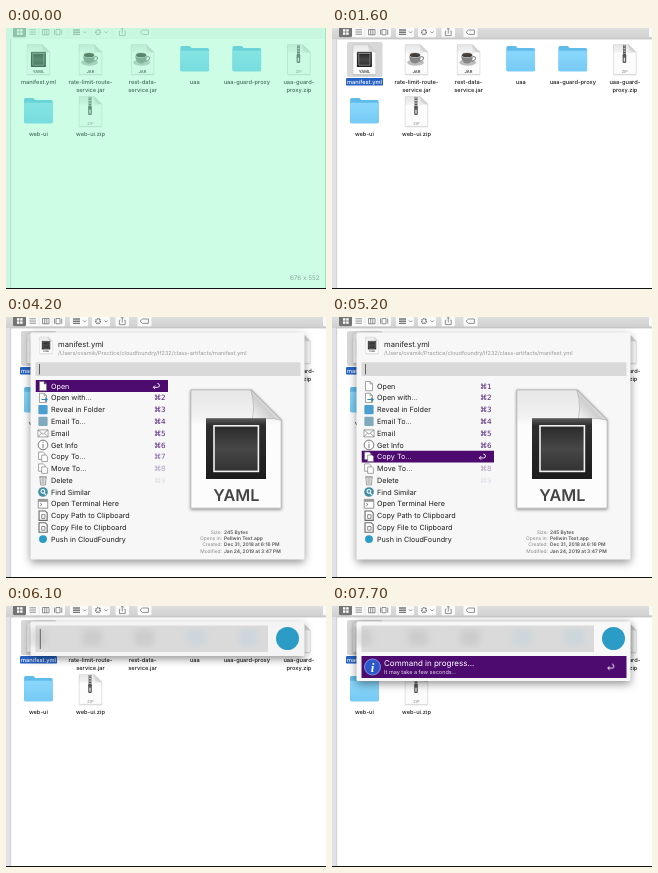
Recreate the animation shown at these times as an HTML page. Size 320 by 261 pixels, loop 7.9 s.

```html
<!DOCTYPE html>
<html lang="en">
<head>
<meta charset="utf-8">
<title>Push from the file browser</title>
<style>
  html, body { margin: 0; width: 100%; height: 100%; overflow: hidden; background: #fff; }
  svg { display: block; width: 100vw; height: 100vh; }
  text { font-family: Inter, "Open Sans", sans-serif; text-rendering: geometricPrecision; }
  .mid { text-anchor: middle; }
  .end { text-anchor: end; }
  .label { font-size: 5.7px; font-weight: 500; fill: #1c1c1c; }
  .kind { font-size: 4.05px; font-weight: 600; fill: #444; }
  .row { font-size: 7.2px; fill: #1c1c1c; }
  .key { font: 7.2px "DejaVu Sans", sans-serif; fill: #4d1a78; }
  .meta { font-size: 4.9px; fill: #8a8a8a; }
  .meta .val { font-weight: 600; fill: #555; }
  .sel .row { fill: #fff; }
  .ret { fill: none; stroke: #fff; stroke-width: .9; }
  .panel { filter: drop-shadow(0 3px 4px rgba(0, 0, 0, .42)); }

  .anim { animation: 7.9s step-end infinite; }
  .flash { animation-name: flash; }
  .active { animation-name: active; }
  .dim { animation-name: dim; }
  .menu { animation-name: menu; }
  .bar { animation-name: bar; }
  .busy { animation-name: busy; }
  .enter { animation-name: enter; }
  .caret { animation-name: caret; }
  .pick { animation-name: pick; }

  @keyframes flash { 0% { opacity: 1 } 1.26%, 100% { opacity: 0 } }
  @keyframes active { 0% { opacity: 0 } 20.25%, 100% { opacity: 1 } }
  @keyframes dim { 0% { opacity: .65 } 20.25%, 100% { opacity: 1 } }
  @keyframes menu { 0% { opacity: 0 } 53.16% { opacity: 1 } 77.21%, 100% { opacity: 0 } }
  @keyframes bar { 0% { opacity: 0 } 77.21%, 100% { opacity: 1 } }
  @keyframes busy { 0% { opacity: 0 } 88.6%, 100% { opacity: 1 } }
  @keyframes enter { 0% { opacity: 0 } 91.13%, 100% { opacity: 1 } }
  @keyframes caret {
    0% { opacity: 1 } 58.22% { opacity: 0 } 64.55% { opacity: 1 } 70.88% { opacity: 0 }
    77.21% { opacity: 1 } 83.54% { opacity: 0 } 91.13% { opacity: 1 } 97.46%, 100% { opacity: 0 }
  }
  /* one menu row is 11.77px high */
  @keyframes pick {
    0% { transform: translateY(0) }
    58.22% { transform: translateY(11.77px) }
    59.49% { transform: translateY(23.54px) }
    63.29% { transform: translateY(35.31px) }
    64.55% { transform: translateY(47.08px) }
    65.82% { transform: translateY(70.62px) }
    67.08% { transform: translateY(82.39px) }
    68.35% { transform: translateY(94.16px) }
    70.88% { transform: translateY(105.93px) }
    72.15% { transform: translateY(117.7px) }
    73.41% { transform: translateY(129.47px) }
    74.68% { transform: translateY(141.24px) }
    75.94%, 100% { transform: translateY(153.01px) }
  }
</style>
</head>
<body>
<svg viewBox="0 0 320 261" preserveAspectRatio="none">
  <defs>
    <linearGradient id="tool" x2="0" y2="1">
      <stop stop-color="#dedede"/><stop offset="1" stop-color="#cfcfcf"/>
    </linearGradient>
    <linearGradient id="sky" x2="0" y2="1">
      <stop stop-color="#8ad7fb"/><stop offset="1" stop-color="#76caf5"/>
    </linearGradient>
    <linearGradient id="paper" x2="0" y2="1">
      <stop stop-color="#e6e6e6"/><stop offset=".22" stop-color="#f1f1f1"/><stop offset=".3" stop-color="#fcfcfc"/>
    </linearGradient>
    <linearGradient id="bevel" x2="0" y2="1">
      <stop stop-color="#5c5c5c"/><stop offset=".12" stop-color="#2e2e2e"/><stop offset="1" stop-color="#1c1c1c"/>
    </linearGradient>
    <linearGradient id="slate" x2="0" y2="1">
      <stop stop-color="#2a2a2a"/><stop offset=".5" stop-color="#474747"/><stop offset="1" stop-color="#333"/>
    </linearGradient>
    <linearGradient id="curl" x1="0" y1="1" x2="1" y2="0">
      <stop stop-color="#fff"/><stop offset=".45" stop-color="#cfcfcf"/><stop offset=".8" stop-color="#f6f6f6"/>
    </linearGradient>
    <filter id="soft"><feGaussianBlur stdDeviation="3"/></filter>
    <filter id="lift" x="-20%" y="-20%" width="140%" height="140%">
      <feDropShadow dx="0" dy=".3" stdDeviation=".45" flood-opacity=".4"/>
    </filter>
    <clipPath id="slot"><rect class="anim pick" x="29.5" y="63.1" width="132.5" height="11.9"/></clipPath>

    <g id="doc">
      <path d="M.2.2H15.4L22.8 7.6V29.8H.2Z" fill="url(#paper)" stroke="#aaa" stroke-width=".2" filter="url(#lift)"/>
      <path d="M15.2.2Q16.6 5 15.2 8.6Q18.6 6.6 22.8 7.8Z" fill="url(#curl)" stroke="#aaa" stroke-width=".15"/>
    </g>
    <g id="yaml">
      <use href="#doc"/>
      <rect x="4" y="7.3" width="15" height="15.2" fill="url(#bevel)"/>
      <rect x="6" y="9.2" width="11.1" height="11.4" fill="url(#slate)" stroke="#f2f2f2" stroke-width=".4"/>
      <text class="kind mid" x="11.6" y="28">YAML</text>
    </g>
    <g id="jar">
      <use href="#doc"/>
      <ellipse cx="10.6" cy="18" rx="8.4" ry="3.2" fill="#bdbdbd"/>
      <path d="M4 10.5Q4.5 19 10 19T16 10.5Z" fill="#858585"/>
      <path d="M15.5 12q4.4 .2 2.6 2.8t-4.4 1.5" fill="none" stroke="#858585" stroke-width="1.1"/>
      <ellipse cx="10" cy="10.5" rx="6.2" ry="3" fill="#dcdcdc"/>
      <ellipse cx="10" cy="10.7" rx="5" ry="2.1" fill="#453d39"/>
      <text class="kind mid" x="11.4" y="28">JAR</text>
    </g>
    <g id="zip">
      <use href="#doc"/>
      <path d="M11 .4V12" stroke="#555" stroke-width="2.8"/>
      <path d="M11 .4V12" stroke="#ccc" stroke-width="1.8" stroke-dasharray=".8 .8"/>
      <rect x="9.2" y="9.5" width="3.6" height="9" rx="1.3" fill="#555"/>
      <rect x="10.3" y="13" width="1.4" height="4.2" rx=".6" fill="#ddd"/>
      <text class="kind mid" x="11.4" y="28" style="font-weight:400;fill:#888">ZIP</text>
    </g>
    <g id="folder">
      <path d="M0 2Q0 .4 1.4 .4H9.2L11.2 2.4H27Q28.6 2.4 28.6 4V24Q28.6 25.6 27 25.6H1.6Q0 25.6 0 24Z" fill="#5fbbe9"/>
      <path d="M0 5H28.6V24Q28.6 25.6 27 25.6H1.6Q0 25.6 0 24Z" fill="url(#sky)"/>
    </g>
    <path id="ret" class="ret" d="M4.8-2.2Q7-2.2 7-.2T4.8 1.6H.8M2.6-.2L.8 1.6L2.6 3.4"/>
  </defs>

  <rect width="320" height="261" fill="#fff"/>
  <rect width="5" height="261" fill="#f8f8f9"/>
  <rect width="320" height="11" fill="#f5f5f5"/>
  <g class="anim active">
    <rect width="5" height="261" fill="#e1e1e6"/>
    <rect width="320" height="11" fill="url(#tool)"/>
    <path d="M4.5 11H320" stroke="#bcbcbc" stroke-width=".7"/>
    <rect x="15" y="14" width="35.5" height="35" rx="2" fill="#d8d8d8"/>
  </g>
  <path d="M4.7 11V260" stroke="#c8c8cc" stroke-width=".7"/>

  <g id="tools" class="anim dim"></g>
  <g id="files"></g>
  <g class="anim active">
    <rect x="14" y="50" width="37" height="7.6" rx="1.2" fill="#2561c4"/>
    <text class="label mid" x="32.5" y="56" style="fill:#fff">manifest.yml</text>
  </g>

  <g class="anim menu">
    <rect class="panel" x="24.5" y="15.5" width="274" height="227" rx="1.5" fill="#f7f7f7"/>
    <use href="#yaml" transform="translate(33.6 19.8) scale(.56)"/>
    <text x="52" y="30" font-size="7.6" fill="#222">manifest.yml</text>
    <text x="52" y="38.4" font-size="5.55" fill="#999">/Users/ovamik/Practice/cloudfoundry/lf232/class-artifacts/manifest.yml</text>
    <rect x="29.5" y="45.3" width="265" height="13.7" fill="#d9d9d9"/>
    <path class="anim caret" d="M33.5 47V57.5" stroke="#444" stroke-width=".8"/>
    <g id="rows"></g>
    <g class="sel" clip-path="url(#slot)">
      <rect x="29.5" y="60" width="132.5" height="172" fill="#4d0b70"/>
      <g id="lit"></g>
    </g>
    <use href="#yaml" transform="translate(184 72) scale(4)"/>
    <g id="info"></g>
  </g>

  <g class="anim bar">
    <rect class="panel" x="24.5" y="15.5" width="274" height="34.5" rx="1.5" fill="#f4f4f4"/>
    <g class="anim busy">
      <rect class="panel" x="24.5" y="15.5" width="274" height="59.5" rx="1.5" fill="#f8f8f8"/>
    </g>
    <rect x="29.5" y="19.5" width="232.5" height="26.5" fill="#dadada"/>
    <g id="haze" filter="url(#soft)" opacity=".35"></g>
    <path class="anim caret" d="M34.3 23V43" stroke="#555" stroke-width=".9"/>
    <circle cx="281.5" cy="32.5" r="11.5" fill="#2b9cc6"/>
    <g class="anim busy">
      <rect x="29.5" y="50" width="265" height="22" fill="#4d0b70"/>
      <circle cx="40.5" cy="61" r="8" fill="#2c56c9" stroke="#8fa9ee" stroke-width=".8"/>
      <text class="mid" x="40.5" y="65.6" style="font:italic bold 13px 'Liberation Serif',serif" fill="#fff">i</text>
      <text x="52" y="60" font-size="8" fill="#fff">Command in progress...</text>
      <text x="52" y="67.6" font-size="5.5" fill="#e4d9ec">It may take a few seconds...</text>
      <use class="anim enter" href="#ret" x="275" y="60.5"/>
    </g>
  </g>

  <g class="anim flash">
    <rect width="320" height="260" fill="#7dfabb" opacity=".38"/>
    <text class="end" x="313.5" y="252.4" font-size="6.3" fill="#8aa99a">676 x 552</text>
    <path d="M319.6 0V260" stroke="#8fd8b4" stroke-width=".8"/>
  </g>
  <rect y="260" width="320" height="1" fill="#111"/>
</svg>

<script>
  const put = (id, html) => { document.getElementById(id).innerHTML = html; };
  const rect = (x, y, w, h, fill, rx = 0) =>
    `<rect x="${x}" y="${y}" width="${w}" height="${h}" fill="${fill}" rx="${rx}"/>`;
  const line = (d, color = '#777', w = .8, fill = 'none') =>
    `<path d="${d}" fill="${fill}" stroke="${color}" stroke-width="${w}"/>`;
  const text = (cls, x, y, s) => `<text class="${cls}" x="${x}" y="${y}">${s}</text>`;

  // Toolbar
  const button = (x, w) => rect(x, -2, w, 11.3, '#fafafa', 1.5);
  put('tools',
    button(7, 52) + button(64, 18) + button(86, 18) + button(109.5, 13.5) + button(131.5, 14) + button(317, 8) +
    rect(7, -2, 13, 11.3, '#747474', 1.5) +
    [[11, 1.2], [14.2, 1.2], [11, 4.4], [14.2, 4.4]].map(([x, y]) => rect(x, y, 2.4, 2.4, '#fff')).join('') +
    line('M23.5 1.8H30M23.5 4H30M23.5 6.2H30M36.5 1.5H43V6.8H36.5ZM38.7 1.5V6.8M40.8 1.5V6.8M50 1.5H54V6.8H50ZM48.5 1.5V6.8M55.7 1.5V6.8') +
    line('M33 -1V9M46 -1V9', '#d5d5d5', .5) +
    line('M67 2H74M67 4.2H74M67 6.4H74', '#777', 1.4) + line('M77 3.4L78.6 5L80.2 3.4M98.5 3.4L100.1 5L101.7 3.4') +
    `<circle cx="92" cy="4.1" r="2.3" fill="none" stroke="#777" stroke-width="1.6" stroke-dasharray="1.2 .6"/>` +
    line('M114.3 3.2H113.4V7.6H119.2V3.2H118.3M116.3 5.5V.2M114.9 1.4L116.3 0L117.7 1.4') +
    line('M134 4.2L136.4 2H142.4V6.4H136.4Z'));

  // Files: kind, column, row, label lines
  const files = [
    ['yaml', 0, 0, 'manifest.yml'], ['jar', 1, 0, 'rate-limit-route-', 'service.jar'],
    ['jar', 2, 0, 'rest-data-', 'service.jar'], ['folder', 3, 0, 'uaa'],
    ['folder', 4, 0, 'uaa-guard-proxy'], ['zip', 5, 0, 'uaa-guard-', 'proxy.zip'],
    ['folder', 0, 1, 'web-ui'], ['zip', 1, 1, 'web-ui.zip']
  ];
  put('files', files.map(([kind, col, row, ...lines]) => {
    const x = 32.4 + col * 52.1, y = 16.5 + row * 52;
    return `<use href="#${kind}" x="${x - (kind === 'folder' ? 14.3 : 11.5)}" y="${y + (kind === 'folder' ? 1.2 : 0)}"/>` +
      lines.map((s, i) => text('label mid', x, y + 39.4 + i * 7.7, s)).join('');
  }).join(''));

  // Menu
  const sheet = line('M-3.2-4.2H1L3.2-2V4.2H-3.2ZM1-4.2V-2H3.2', '#777', .6, '#fff');
  const tile = c => rect(-4.2, -4.2, 8.4, 8.4, c, 1);
  const disc = c => `<circle r="4.4" fill="${c}"/>`;
  const pages = line('M-4-4.2H.4L1.6-3V2.5H-4Z', '#777', .6, '#fff') + line('M-1.2-1.5H2.8L4-.3V4.4H-1.2Z', '#777', .6, '#fff');
  const clip = line('M-3.6-4.2H2L3.8-2.4V4.4H-3.6Z', '#666', 1, '#fff') + line('M-1.2-.8H1.8V2.6H-1.2Z', '#666', .7);
  const items = [
    ['Open', sheet], ['Open with...', sheet + line('M-1.5 1.5H3.6M1.8-.3L3.8 1.5L1.8 3.3', '#3a86a8', 1)],
    ['Reveal in Folder', tile('#4a9fd0')], ['Email To...', tile('#7fa9bd')],
    ['Email', line('M-4.6-3H4.6V3.4H-4.6ZL0 1L4.6-3M-4.6 3.4L-1.4 0M4.6 3.4L1.4 0', '#777', .6, '#fff')],
    ['Get Info', disc('#fff') + line('M0-1V3M0-3V-2M-4.4 0A4.4 4.4 0 1 1 4.4 0A4.4 4.4 0 1 1-4.4 0', '#666')],
    ['Copy To...', pages], ['Move To...', pages],
    ['Delete', line('M-2.8-3L-2.2 4.3H2.2L2.8-3ZM-3.5-3H3.5M-.8-2V3.5M.8-2V3.5', '#888', .7)],
    ['Find Similar', disc('#3f8fa8') + line('M-1.8-.6A1.7 1.7 0 1 1 1.6-.6A1.7 1.7 0 1 1-1.8-.6M1.2 1L3 3', '#fff', 1)],
    ['Open Terminal Here', line('M-4.3-4H4.3V4H-4.3Z', '#777', .7, '#fff') + rect(-4.3, -4, 8.6, 2.2, '#999') + line('M-2.5-.6L-1 .6L-2.5 1.8', '#555', .7)],
    ['Copy Path to Clipboard', clip], ['Copy File to Clipboard', clip],
    ['Push in CloudFoundry', `<circle r="3.6" fill="#2b9cc6"/>`]
  ];
  const menu = tail => items.map(([name, icon], i) => {
    const y = 69.1 + i * 11.77;
    return `<g transform="translate(37 ${y}) scale(1.1)">${icon}</g>` + text('row', 45, y + 2.6, name) + tail(i, y);
  }).join('');
  const fade = i => Math.min(1, .12 + .29 * (8 - i));
  put('rows', menu((i, y) => i < 9
    ? `<g opacity="${fade(i)}">${text('key end', 159.7, y + 2.6, '⌘' + (i + 1))}</g>` : ''));
  put('lit', menu((i, y) => `<use href="#ret" x="146.5" y="${y - .4}"/>`));

  put('info', [
    ['Size:', '245 Bytes'], ['Opens in:', 'Pellwin Text.app'],
    ['Created:', 'Dec 31, 2018 at 6:16 PM'], ['Modified:', 'Jan 24, 2019 at 3:47 PM']
  ].map(([k, v], i) => `<g class="meta">${text('end', 216, 216.8 + i * 6.25, k)}${text('val', 218, 216.8 + i * 6.25, v)}</g>`).join(''));

  // Icons seen faintly through the input bar
  put('haze', [0, 1, 2, 3, 4].map(i =>
    rect(24 + i * 52.1, 23, i ? 20 : 16, 17, i > 2 ? '#b4cfdd' : '#b4b4b4', 5)).join(''));
</script>
</body>
</html>
```
